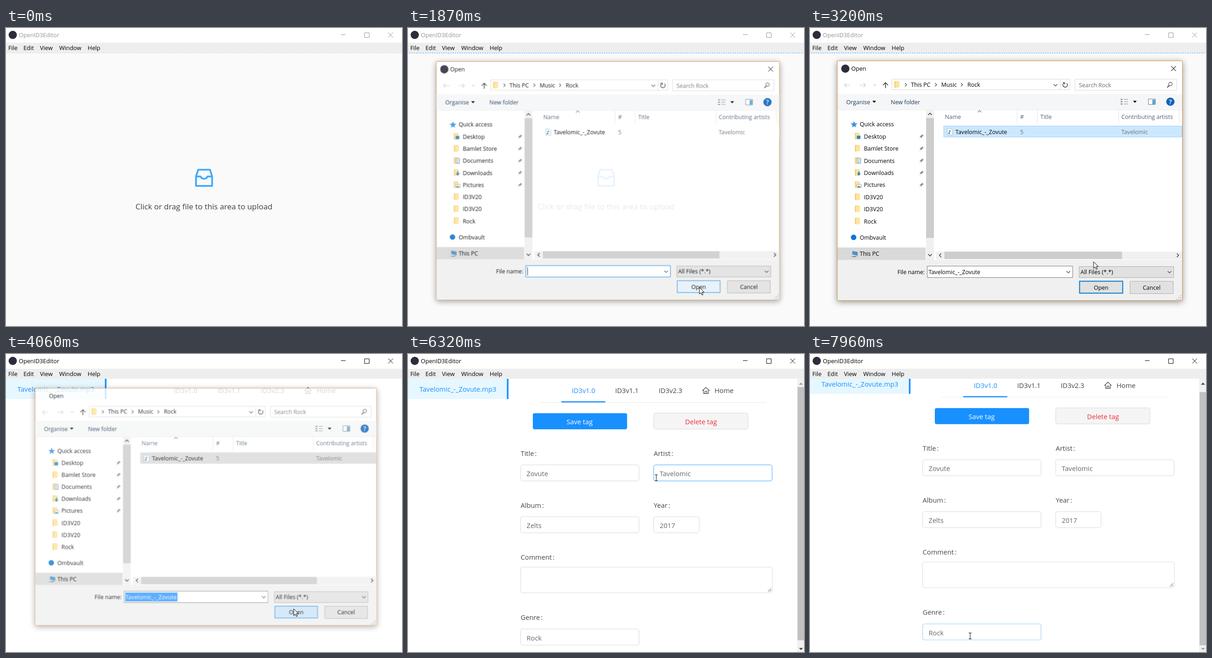
An HTML page that plays this animation: 863 px wide and 649 px high, repeating every 7990 ms.

```html
<!DOCTYPE html>
<html lang="en">
<head>
<meta charset="utf-8">
<title>OpenID3Editor</title>
<style>
html, body { margin: 0; width: 100%; height: 100%; overflow: hidden; background: #fff; }
svg { display: block; width: 863px; height: 649px; }
text { font-family: "Open Sans", "Noto Sans", sans-serif; font-size: 12.5px; white-space: pre; }
.mid { text-anchor: middle; }
.menu text { font-size: 12.8px; }
.line { fill: none; stroke: #444; stroke-width: 1.2; }
.win { color: #949494; }
.win text { fill: currentColor; font-size: 12.7px; }
.win path { fill: none; stroke: currentColor; }
.upload text { font-size: 16.9px; fill: #404040; }
#dash { stroke: #d9d9d9; stroke-dasharray: 3 2; }
#dialog { transform-origin: 435.5px 332.5px; }
#frame { fill: #fff; stroke: #d6973f; filter: drop-shadow(0 3px 7px rgba(0, 0, 0, .4)); }
.head text { fill: #4c607a; }
.tool text { fill: #1e395b; }
.grey { fill: #6d6d6d; }
.page text { font-size: 14.7px; fill: #444; }
.page .blue { fill: #1890ff; }
.page .val text { fill: #666; }
.input { fill: #fff; stroke: #d9d9d9; }
.cur path { fill: #fff; stroke: #000; stroke-width: 1; stroke-linejoin: round; }
</style>
</head>
<body>
<svg viewBox="0 0 863 649">
  <defs>
    <path id="down" class="line" d="M-4 -2L0 2L4 -2"/>
    <path id="right" class="line" d="M-2 -3.5L1.5 0L-2 3.5"/>
    <path id="tri" d="M-4 -2H4L0 2.5Z"/>
    <path id="pin" fill="#8a8f96" d="M1 -5L5 -1L3 -.5L.5 2L.5 4L-1.5 2L-5 5.5L-2.3 1.2L-4 -.8L-2 -1L1 -3.5Z"/>
    <g id="folder">
      <path fill="#f3ca62" d="M0 0H9V14H0Z"/>
      <path fill="#ffe49b" d="M2 1H11V12L9 14H2Z"/>
    </g>
    <g id="song">
      <path fill="#fff" stroke="#bbb" d="M.5 .5H8L11.5 4V14.5H.5Z"/>
      <path fill="none" stroke="#2b86c9" stroke-width="1.4" d="M5 11V5L8 6.5"/>
      <circle cx="4" cy="11" r="1.7" fill="#2b86c9"/>
    </g>
    <clipPath id="body"><path d="M0 54H863V649H0Z"/></clipPath>
  </defs>

  <path fill="#fff" d="M0 0H863V649H0Z"/>

  <g class="upload" id="upload">
    <path fill="#fafafa" d="M0 54H863V649H0Z"/>
    <path id="dash" d="M2 54.5H862"/>
    <g fill="none" stroke="#40a9ff" stroke-width="3.8" stroke-linejoin="round">
      <path d="M419 308.7H444.5L449.2 323V343.8H414V323Z"/>
      <path d="M414 323.3H424Q426 328.3 431.6 328.3T439 323.3H449"/>
    </g>
    <text class="mid" x="431.5" y="395">Click or drag file to this area to upload</text>
  </g>

  <g class="page" id="page" clip-path="url(#body)">
    <g id="scroll">
      <path fill="#e6f7ff" d="M0 54H219V98H0Z"/>
      <path fill="#1890ff" d="M215.5 54H219V98H215.5Z"/>
      <text class="blue" x="25" y="82">Tavelomic_-_Zovute.mp3</text>
      <g id="tabs">
        <path stroke="#e8e8e8" d="M285 105.5H781"/>
        <text id="tab1" x="357" y="85">ID3v1.0</text>
        <text x="451.5" y="85">ID3v1.1</text>
        <text x="546.5" y="85">ID3v2.3</text>
        <path class="line" d="M641.5 80L649.2 72.7L657 80M644 78.5V86.2H654.5V78.5M647.3 86V81.2H651.2V86"/>
        <text x="668" y="85">Home</text>
      </g>
      <g id="form"></g>
    </g>
    <g id="bar">
      <path fill="#f1f1f1" d="M848 54H863V649H848Z"/>
      <path id="thumb" fill="#c1c1c1" d="M849 72H863V623.5H849Z"/>
      <path id="up" fill="#a3a3a3" d="M852 67H861L856.5 62Z"/>
      <path id="dn" fill="#505050" d="M852 640H861L856.5 645Z"/>
    </g>
  </g>

  <path fill="#fff" d="M0 0H863V32H0Z"/>
  <g class="win" id="win">
    <circle cx="14.7" cy="15" r="9" fill="#2b2e3a"/>
    <text x="28" y="20">OpenID3Editor</text>
    <path d="M730 14.5H740M781.5 10.5H791.5V20.5H781.5ZM833 10L843.5 20.5M843.5 10L833 20.5"/>
  </g>
  <g class="menu">
    <path fill="#eee" d="M0 32H863V54H0Z"/>
    <text x="5" y="48">File</text><text x="38" y="48">Edit</text><text x="74" y="48">View</text>
    <text x="116" y="48">Window</text><text x="178" y="48">Help</text>
  </g>

  <g id="dialog">
    <path id="frame" d="M59.5 71.5H811.5V593.5H59.5Z"/>
    <g id="caption">
      <circle cx="77" cy="88.5" r="9" fill="#2b2e3a"/>
      <path class="line" d="M787 83L797.5 93.5M797.5 83L787 93.5"/>
    </g>
    <text x="90" y="93">Open</text>

    <path class="line" style="stroke:#ccc" d="M88 124.5H75.5M80 120L75.5 124.5L80 129M108 124.5H121M116.5 120L121 124.5L116.5 129M138 122.5L141 125.5L144 122.5"/>
    <path class="line" style="stroke-width:1.7" d="M164.5 131V119M159 124.5L164.5 119L170 124.5"/>
    <path fill="none" stroke="#d9d9d9" d="M178.5 111.5H566.5V134.5H178.5ZM545.5 111.5V134.5M577.5 111.5H799.5V135.5H577.5Z"/>
    <use href="#folder" x="184" y="116"/>
    <use href="#right" x="209" y="123.5"/><text x="220" y="128">This PC</text>
    <use href="#right" x="274.5" y="123.5"/><text x="286" y="128">Music</text>
    <use href="#right" x="331" y="123.5"/><text x="343" y="128">Rock</text>
    <use href="#down" x="535" y="124.5"/>
    <path class="line" style="stroke-width:1.5" d="M559.5 120.2A5 5 0 1 1 553 120M551 119H555V123"/>
    <text class="grey" x="586" y="129">Search Rock</text>
    <circle class="line" cx="785.5" cy="122" r="3.8"/><path class="line" style="stroke-width:1.8" d="M783 125L778.5 129.5"/>

    <g class="tool">
      <path fill="#f5f6f7" d="M60 144H811V178H60Z"/>
      <text x="79" y="165.5">Organise</text><use href="#tri" x="140" y="160.5"/>
      <text x="176" y="165.5">New folder</text>
      <path stroke="#777" stroke-width="2" stroke-dasharray="4 2" d="M677 155.5H682M677 160.5H682M677 165.5H682"/>
      <path stroke="#888" d="M684 155.5H693M684 160.5H693M684 165.5H693"/>
      <use href="#tri" x="708" y="160.5"/>
      <path fill="#fff" stroke="#777" d="M737.5 154.5H752.5V166.5H737.5Z"/><path fill="#5aa9dd" d="M746 156H752V166H746Z"/>
      <circle cx="785.3" cy="160.5" r="9" fill="#0a63b8"/>
      <text class="mid" x="785.3" y="165.5" style="fill:#fff;font-weight:600;font-size:14px">?</text>
    </g>

    <path fill="#d9d9d9" d="M60 478H252V505H60Z"/>
    <path stroke="#ececec" d="M60 178.5H811"/>
    <g id="places"></g>
    <path fill="#f0f0f0" d="M253 179H270V505H253ZM275 487H811V504H275Z"/>
    <path fill="#cdcdcd" d="M253 196H270V457H253ZM293 487H680V503H293Z"/>
    <path class="line" style="stroke-width:1.6" d="M257.5 189.5L261.5 185.5L265.5 189.5M257.5 492.5L261.5 496.5L265.5 492.5M286 491L282 495L286 499M799.5 491L803.5 495L799.5 499"/>

    <g class="head">
      <path stroke="#e5e5e5" d="M451.5 179V208M495.5 179V208M672.5 179V208M804.5 179V208"/>
      <path class="line" style="stroke:#777" d="M365.5 183.5L369.5 179.5L373.5 183.5"/>
      <text x="294" y="197.5">Name</text><text x="458" y="197.5">#</text>
      <text x="502" y="197.5">Title</text><text x="678.5" y="197.5">Contributing artists</text>
    </g>
    <path id="row" fill="#fff" stroke="#fff" d="M291.5 213.5H810.5V237.5H291.5Z"/>
    <use href="#song" x="299" y="218.5"/>
    <text x="317" y="231">Tavelomic_-_Zovute</text>
    <text class="grey" x="458" y="231">5</text><text class="grey" x="678.5" y="231">Tavelomic</text>

    <path fill="#f0f0f0" d="M60 505H811V593H60Z"/>
    <text x="190.5" y="536">File name:</text>
    <path id="field" fill="#fff" stroke="#0078d7" d="M255.5 518.5H572.5V543.5H255.5Z"/>
    <path id="caret" stroke="#000" d="M259.5 522V540"/>
    <path id="mark" fill="#3399ff" d="M258 521.5H373V541H258Z"/>
    <text id="fname" x="258.5" y="536">Tavelomic_-_Zovute</text>
    <use href="#down" x="563" y="531.5"/>
    <path fill="#e1e1e1" stroke="#adadad" d="M586.5 519.5H792.5V543.5H586.5ZM697.5 551.5H791.5V578.5H697.5Z"/>
    <text x="589.5" y="536">All Files (*.*)</text><use href="#down" x="783.5" y="531.5"/>
    <path id="open" fill="#e1e1e1" stroke="#0078d7" d="M587.5 551.5H681.5V577.5H587.5Z"/>
    <text class="mid" x="634.5" y="569.5">Open</text><text class="mid" x="744.5" y="569.5">Cancel</text>
    <path stroke="#b5b5b5" stroke-width="2" stroke-dasharray="2 2" d="M807 583H809M803 587H809M799 591H809"/>
  </g>

  <g class="cur" id="cursor">
    <g id="arrow"><path d="M0 0V14.5L3.4 11.4L5.8 16.6L8 15.6L5.7 10.5H10.3Z"/></g>
    <g id="hand">
      <path d="M-2 2.3A1.8 1.8 0 0 1 1.6 2.3V8L6 9.2Q8.2 9.8 8 12Q7.8 15.5 6.3 17.5V21H-2.5V18.5Q-4.6 16 -6.6 12.4Q-7.4 10.8 -6 10.2Q-4.8 9.8 -3.5 11.2L-2 12.6Z"/>
      <path style="fill:none" d="M1.6 8V11.5M4 9V11.8"/>
    </g>
    <g id="beam"><path d="M-3 -6.5H3M0 -6.5V6.5M-3 6.5H3"/></g>
  </g>
</svg>

<script>
const LOOP = 7990;
const $ = id => document.getElementById(id);

// label, input id, value, x, top, width, height
const fields = [
  ['Title', 'title', 'Zovute', 245, 241, 258, 35],
  ['Artist', 'artist', 'Tavelomic', 535, 241, 258, 35],
  ['Album', 'album', 'Zelts', 245, 354, 258, 35],
  ['Year', 'year', '2017', 535, 354, 99, 35],
  ['Comment', 'comment', '', 245, 463.5, 548.5, 56],
  ['Genre', 'genre', 'Rock', 245, 598.5, 258, 35]
];
const box = ([, id, , x, y, w, h]) =>
  `<rect class="input" id="${id}" x="${x + .5}" y="${y + .5}" width="${w}" height="${h}" rx="4"/>`;
const label = ([name, , , x, y]) =>
  `<text x="${x + .5}" y="${y - (name == 'Comment' ? 15.5 : 19.5)}">${name}<tspan dx="2">:</tspan></text>`;
const value = ([, , v, x, y]) => `<text x="${x + 13.5}" y="${y + 25}">${v}</text>`;
$('form').innerHTML = `
  <path fill="#1890ff" d="M334 103H430V105.5H334Z"/>
  <rect x="272" y="129" width="205.5" height="35" rx="4" fill="#1890ff"/>
  <text class="mid" x="374" y="152.5" style="fill:#fff">Save tag</text>
  <rect x="535.5" y="128.5" width="205.5" height="35" rx="4" fill="#f5f5f5" stroke="#d9d9d9"/>
  <text class="mid" x="638.5" y="152.5" style="fill:#ee2d3b">Delete tag</text>
  ${fields.map(f => label(f) + box(f)).join('')}
  <path class="line" style="stroke-width:1" d="M784.5 517.5L791.5 510.5M788.5 517.5L791.5 514.5"/>
  <text id="hint" x="258.5" y="623.5" style="fill:#bfbfbf">Genre</text>
  <g class="val" id="values">${fields.map(value).join('')}</g>`;

const badge = {
  Desktop: '<path fill="#2b86c9" d="M4 6H12V13H4Z"/>',
  Documents: '<path fill="#fff" stroke="#6f8da8" d="M4.5 2.5H12.5V13.5H4.5ZM6 5.5H11M6 8.5H11M6 11.5H11"/>',
  Downloads: '<path fill="#2b86c9" d="M7 5H10V9H13L8.5 14L4 9H7Z"/>',
  Pictures: '<path fill="#fff" stroke="#8aa" d="M4.5 6.5H13.5V13.5H4.5Z"/><path fill="#4a90b8" d="M5 13L8 9L13 13Z"/>'
};
const places = ['Desktop', 'Bamlet Store', 'Documents', 'Downloads', 'Pictures', 'ID3V20', 'ID3V20', 'Rock'];
$('places').innerHTML = `
  <path fill="#3b93dc" d="M96 202.5L98 207.5L103.5 208L99.3 211.5L100.5 216.5L96 213.7L91.5 216.5L92.7 211.5L88.5 208L94 207.5Z"/>
  <text x="108.5" y="214">Quick access</text>
  ${places.map((p, i) => {
    const y = 236 + i * 26.4;
    return `<g transform="translate(98 ${y - 7.5})"><use href="#folder"/>${badge[p] || ''}</g>
      <text x="117.5" y="${y + 4.7}">${p}</text>` +
      (i < 5 ? `<use href="#pin" x="243" y="${y}"/>` : '');
  }).join('')}
  <circle cx="95" cy="456" r="6" fill="#0a78d4"/>
  <text x="108.5" y="461">Ombvault</text>
  <path fill="#3f95d6" stroke="#7a98ae" d="M92.5 486L103.5 488V495.5L92.5 493Z"/>
  <path stroke="#9aa" d="M89 497.5L97 498.5L103 497"/>
  <text x="108.5" y="496">This PC</text>`;

// keys: [ms, value, easing to the next key]
function anim(id, prop, keys, ease = 'step-end') {
  const frames = keys.map(([t, v, e]) => ({ offset: t / LOOP, [prop]: v, easing: e || ease }));
  frames.push({ offset: 1, [prop]: keys[keys.length - 1][1] });
  $(id).animate(frames, { duration: LOOP, iterations: Infinity });
}
// visible only in the given spans
function show(id, ...spans) {
  const keys = spans.flatMap(([a, b]) => b < LOOP ? [[a, 1], [b, 0]] : [[a, 1]]);
  anim(id, 'opacity', keys[0][0] ? [[0, 0], ...keys] : keys);
}
// border turns blue, then grey again if it is left
function hover(id, on, off, color = '#40a9ff') {
  const idle = '#d9d9d9', fade = 200;
  const keys = [[0, idle], [on, idle], [on + fade, color]];
  if (off) keys.push([off, color], [off + fade, idle]);
  anim(id, 'stroke', keys, 'linear');
}

// window and upload area
anim('win', 'color', [[0, '#949494'], [1410, '#000'], [1790, '#949494'], [3860, '#000']]);
hover('dash', 260);
show('upload', [0, 4010]);
show('page', [4010, LOOP]);

// dialog
const out = 'cubic-bezier(.33,1,.68,1)';
anim('dialog', 'opacity', [[0, 0], [1785, 0, out], [1950, 1], [4025, 1], [4195, 0]], 'linear');
anim('dialog', 'transform', [[0, 'scale(.95)'], [1785, 'scale(.95)', out], [1950, 'scale(1)'],
  [4025, 'scale(1)'], [4195, 'scale(.95)']], 'linear');
show('caption', [0, 3860]);
anim('row', 'fill', [[0, '#fff'], [2480, '#e5f3ff'], [2700, '#cce8ff'], [3860, '#d9d9d9']]);
anim('row', 'stroke', [[0, '#fff'], [2480, '#e5f3ff'], [2700, '#99d1ff'], [3860, '#d9d9d9']]);
anim('field', 'stroke', [[0, '#0078d7'], [2700, '#7a7a7a']]);
show('caret', [0, 2700]);
show('fname', [2700, LOOP]);
show('mark', [3860, LOOP]);
anim('fname', 'fill', [[0, '#000'], [3860, '#fff']]);
anim('open', 'fill', [[0, '#e5f1fb'], [2280, '#e1e1e1'], [3560, '#e5f1fb'], [3860, '#cce4f7']]);
anim('open', 'strokeWidth', [[0, '1px'], [2280, '2px'], [3560, '1px']]);

// tag form
anim('tabs', 'transform', [[0, 'translateX(9px)'], [4860, 'translateX(0px)']]);
anim('tab1', 'fill', [[0, '#444'], [4700, '#1890ff']]);
anim('form', 'opacity', [[0, 0], [4840, 0], [5000, 1]], 'linear');
show('bar', [4860, LOOP]);
show('values', [5240, LOOP]);
show('hint', [0, 5240]);
hover('artist', 6080, 6700);
hover('comment', 7420, 7640);
hover('genre', 7780, 0, '#8cc8f4');
anim('scroll', 'transform', [[0, 'translateY(0px)'], [6410, 'translateY(0px)'], [6510, 'translateY(-11.3px)']], 'ease-out');
anim('thumb', 'transform', [[0, 'translateY(0px)'], [6410, 'translateY(0px)'], [6510, 'translateY(11px)']], 'ease-out');
anim('up', 'fill', [[0, '#a3a3a3'], [6430, '#505050']]);
anim('dn', 'fill', [[0, '#505050'], [6500, '#a3a3a3']]);

// pointer
const path = [
  [0, 8, 350], [240, 8, 350], [670, 403, 416], [945, 403, 416], [985, 384, 383], [1410, 384, 383],
  [1790, 635, 565], [2230, 635, 565], [2600, 430, 229], [3060, 430, 229], [3200, 618, 509],
  [3280, 618, 511], [3700, 627, 555], [4110, 627, 555], [4780, 381, 75], [5670, 381, 75],
  [6300, 541, 269.5], [6520, 541, 269.5], [7200, 560, 106], [7300, 560, 106], [7950, 349, 614]
];
anim('cursor', 'transform', path.map(([t, x, y]) => [t, `translate(${x}px, ${y}px)`]), 'ease-in-out');
show('hand', [240, 1790], [4730, 5740]);
show('arrow', [1790, 4730], [5740, 6210], [6640, 7640], [7730, 7850]);
show('beam', [6210, 6640], [7640, 7730], [7850, LOOP]);
</script>
</body>
</html>
```
